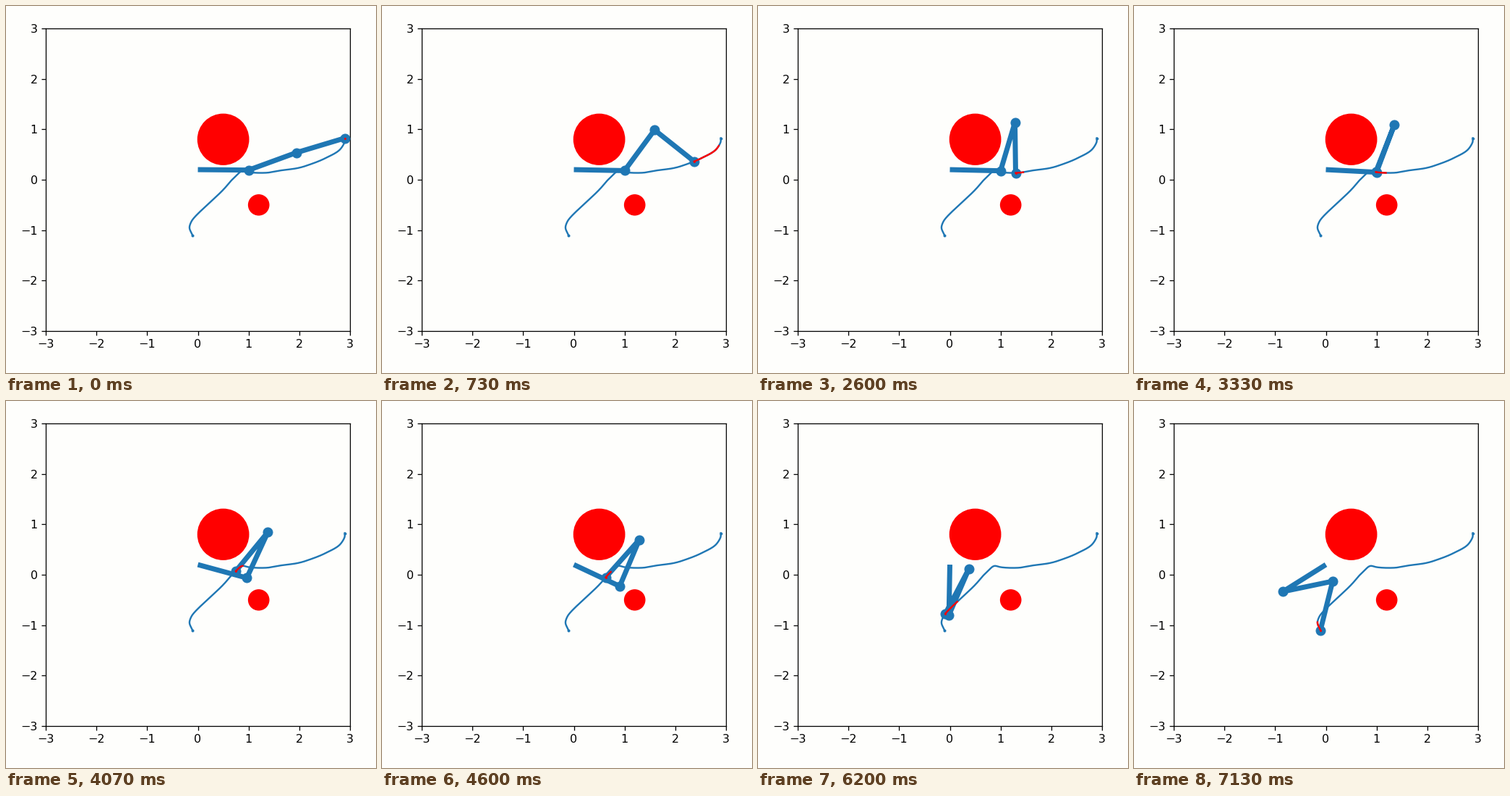
Recreate the animation shown at these times as a matplotlib script. Size 512 by 507 pixels, loop 7190 ms.

```python
import numpy as np
import matplotlib.pyplot as plt
from matplotlib.animation import FuncAnimation
from matplotlib.patches import Circle

W, H = 512, 507
LEFT, BOTTOM, AX_W, AX_H = 55, 58, 421, 418
FRAMES, LOOP_MS = 108, 7190
TRAIL = 7           # steps of history drawn in red
REACH_END = 24      # the first link stays nearly still until here
BASE = 0.2j
BLUE = "#1f77b4"
PX = 115 / 72       # pixels per typographic point

# waypoints of the tool: step, x, y
TOOL = np.array([
    (0, 2.896, .825), (2, 2.89, .735), (4, 2.81, .607), (8, 2.52, .43),
    (13, 2.16, .285), (24, 1.653, .187), (39, 1.297, .136),
    (49.5, .998, .151), (54, .884, .175), (61, .748, .072),
    (78, .456, -.244), (93, -.086, -.768), (95, -.117, -.81),
    (99.5, -.164, -.93), (107, -.107, -1.1),
])

# step, heading of the last link in degrees
WRIST = np.array([
    (24, -69.1), (39, -89.2), (61, -129.3), (78, -128.7),
    (93, -117.5), (101, -102.5), (107, -103.9),
])


def spline(t, keys, values):
    """Cubic Hermite curve through values at the given key times."""
    slope = np.gradient(values, keys)
    i = np.clip(np.searchsorted(keys, t, side="right") - 1, 0, len(keys) - 2)
    h = keys[i + 1] - keys[i]
    u = (t - keys[i]) / h
    return ((1 + 2 * u) * (1 - u) ** 2 * values[i]
            + u * (1 - u) ** 2 * h * slope[i]
            + u * u * (3 - 2 * u) * values[i + 1]
            + u * u * (u - 1) * h * slope[i + 1])


def tool_at(t):
    keys, x, y = TOOL.T
    return spline(t, keys, x) + 1j * spline(t, keys, y)


def heading(deg):
    return np.exp(1j * np.radians(deg))


def elbow(a, b, side):
    """Joint between a and b for two unit links; side +1 bends left."""
    d = b - a
    bend = np.arccos(min(abs(d) / 2, 1))
    return a + np.exp(1j * (np.angle(d) + side * bend))


def pose(k):
    """Base, two joints and tool as complex numbers."""
    tool = tool_at(k)
    if k <= REACH_END:
        j1 = BASE + heading(-0.5 - 1.5 * k / REACH_END)
        j2 = elbow(j1, tool, 1)
    else:
        j2 = tool - heading(spline(k, *WRIST.T))
        j1 = elbow(BASE, j2, -1)
    return np.array([BASE, j1, j2, tool])


# at 72 dpi one unit is one pixel
plt.rcParams.update({
    "font.family": "DejaVu Sans", "font.size": 10 * PX,
    "axes.linewidth": 0.8 * PX,
    **{f"{a}tick.major.{p}": v * PX for a in "xy"
       for p, v in (("size", 3.5), ("pad", 3.5), ("width", 0.8))},
})
fig = plt.figure(figsize=(W / 72, H / 72), dpi=72, facecolor="#fefefc")
ax = fig.add_axes([LEFT / W, BOTTOM / H, AX_W / W, AX_H / H],
                  facecolor="#fefefc")
ax.set(xlim=(-3, 3), ylim=(-3, 3), xticks=range(-3, 4), yticks=range(-3, 4))

for center, radius in (((0.5, 0.8), 0.5), ((1.2, -0.5), 0.2)):
    ax.add_patch(Circle(center, radius, color="red", lw=PX))

path = tool_at(np.linspace(0, FRAMES - 1, 500))
ax.plot(path.real, path.imag, "o-", color=BLUE, lw=1.5 * PX, ms=4, mew=0,
        markevery=[0, -1], zorder=2)
arm, = ax.plot([], [], color=BLUE, lw=7, solid_capstyle="butt", zorder=3)
joints, = ax.plot([], [], "o", color=BLUE, ms=13, mew=1, zorder=4)
trail, = ax.plot([], [], "o-", color="red", lw=1.5 * PX, ms=3, mew=0,
                 markevery=[-1], zorder=5)


def draw(k):
    p = pose(k)
    arm.set_data(p.real, p.imag)
    joints.set_data(p[1:].real, p[1:].imag)
    past = tool_at(np.linspace(max(k - TRAIL, 0), k, 40))
    trail.set_data(past.real, past.imag)
    return arm, joints, trail


anim = FuncAnimation(fig, draw, frames=FRAMES, interval=LOOP_MS / FRAMES,
                     repeat=True, repeat_delay=0)
plt.show()
```
